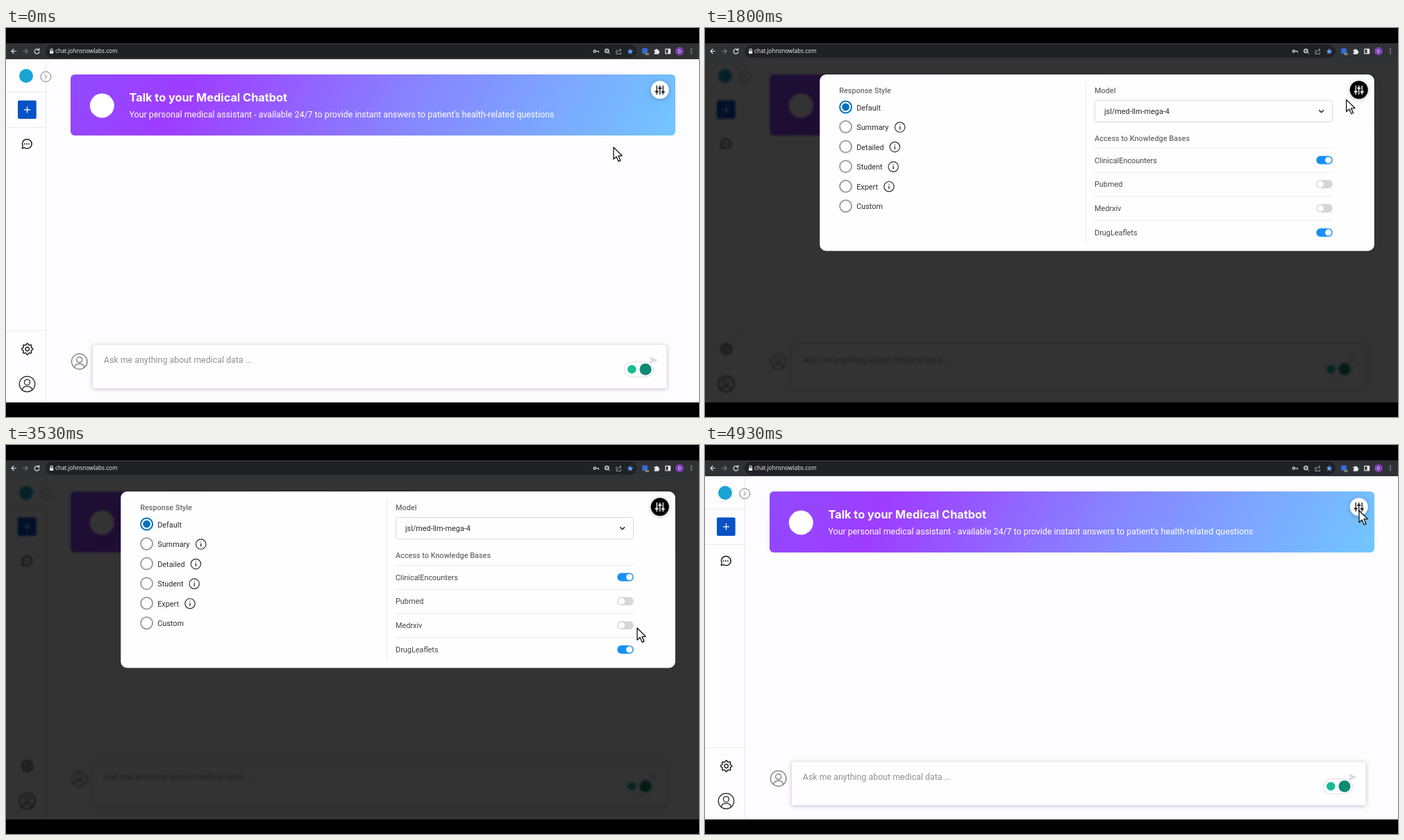
Animation, 998 px wide and 561 px high, one loop 4.99 s. Source, as an HTML page:

```html
<!DOCTYPE html>
<html lang="en">
<head>
<meta charset="utf-8">
<title>Medical Chatbot settings</title>
<style>
  html, body { margin: 0; width: 100%; height: 100%; overflow: hidden; background: #000; }
  svg { display: block; width: 998px; height: 561px; }
  text { font-family: Roboto, sans-serif; font-size: 10.87px; fill: #2b2b2d; }
  .line { fill: none; stroke-linecap: round; stroke-linejoin: round; }
  .rule { stroke: #ebe8ef; }
  .head { font-weight: 500; fill: #6c6c70; }
  .large { font-size: 12.42px; }
  .side { stroke: #1d1d1f; stroke-width: 1.4; }
  .bar { stroke: #dfe1e5; stroke-width: 1.2; }
  .box { filter: drop-shadow(0 1px 3px rgba(70, 35, 80, .3)); }
  .knob { filter: drop-shadow(0 1px 3px rgba(0, 0, 0, .25)); }
  .open #app { filter: blur(1.6px); }
  #shade, #panel { display: none; }
  .open #shade, .open #panel { display: inline; }
  #tune { fill: #fff; stroke: #111; }
  .open #tune { fill: #000; stroke: #fff; }
  #select { fill: #fefdff; stroke: #d9d8df; }
  #select.hover { stroke: #85858c; }
</style>
</head>
<body>
<svg id="stage" viewBox="0 0 998 561">
  <defs>
    <linearGradient id="banner" gradientUnits="userSpaceOnUse" x1="100" y1="20" x2="870" y2="405">
      <stop offset="0" stop-color="#8f4bff"/>
      <stop offset=".2" stop-color="#9e3dff"/>
      <stop offset=".55" stop-color="#8785ff"/>
      <stop offset="1" stop-color="#70ccff"/>
    </linearGradient>
    <clipPath id="page"><rect y="45" width="998" height="495"/></clipPath>
    <g id="user" class="line">
      <circle r="11.2"/>
      <circle cy="-2.6" r="4"/>
      <path d="M-7 8.2C-6 1.8 6 1.8 7 8.2"/>
    </g>
  </defs>

  <rect width="998" height="561"/>

  <!-- browser bar -->
  <rect y="22" width="998" height="23" fill="#303134"/>
  <rect x="57" y="24" width="851" height="19" rx="9.5" fill="#202124"/>
  <g class="line bar">
    <path d="M14.5 33.5H8M11 30.5l-3 3 3 3"/>
    <path d="M24.5 33.5H31M28 30.5l3 3-3 3" stroke="#77797d"/>
    <path d="M47 31.5a3.4 3.4 0 1 0 .8 2.8M47.8 29.6v2.4h-2.4"/>
    <path d="M64 33v-1.4a1.6 1.6 0 0 1 3.2 0V33"/>
    <circle cx="847.8" cy="33.5" r="1.6"/>
    <path d="M849.5 33.5h3.8v1.6"/>
    <circle cx="865.3" cy="33" r="2.7"/>
    <path d="M867.5 35.2l2 2M864.2 33h2.2" stroke-width="1"/>
    <path d="M880 32h-1v5.5h6.500v-2M881 35c.4-2.400 2-3.300 4.500-3.300M884 29.800l2 1.900-2 1.900" stroke="#9a9ca0" stroke-width="1"/>
    <rect x="949.8" y="30.3" width="6.8" height="6.600"/>
  </g>
  <rect x="63" y="33" width="5.200" height="4" rx=".6" fill="#dfe1e5"/>
  <text x="71" y="35.700" style="font:8.100px 'Noto Sans',sans-serif;fill:#e8eaed">chat.johnsnowlabs.com</text>
  <path d="M899 29.300l1.300 2.900 3.200.3-2.400 2.100.7 3.100-2.800-1.600-2.800 1.600.7-3.100-2.400-2.100 3.200-.3z" fill="#5b9bf8"/>
  <rect x="916" y="29.300" width="8" height="8" rx="1.500" fill="#2c6be0"/>
  <rect x="919.500" y="35" width="7" height="5" rx="1" fill="#3c4043"/>
  <text x="923" y="39.300" text-anchor="middle" style="font-size:5px;fill:#fff">9+</text>
  <path d="M933.500 31.500h2a1.300 1.300 0 0 1 2.600 0h2v2a1.300 1.300 0 0 1 0 2.600v1.600h-6.600v-2a1.200 1.200 0 0 0 0-2.400z" fill="#e8eaed"/>
  <rect x="953.400" y="30.300" width="3.400" height="6.600" fill="#e8eaed"/>
  <circle cx="970" cy="33.500" r="6" fill="#7b3fb0"/>
  <text x="970" y="35.900" text-anchor="middle" style="font-size:6.500px;fill:#fff">D</text>
  <path d="M987 30.500v.01M987 33.500v.01M987 36.500v.01" class="line" stroke="#e8eaed" stroke-width="1.600"/>

  <!-- page -->
  <g clip-path="url(#page)">
    <rect y="45" width="998" height="495" fill="#fdfcfe"/>
    <g id="app">
      <path class="rule" d="M57.500 45V540M0 92.500H57M0 143.500H57M0 436.500H57"/>
      <circle cx="29" cy="69" r="10" fill="#18a5d3"/>
      <circle cx="57.300" cy="70.200" r="7.300" fill="#fdfcfe" stroke="#77757a"/>
      <path class="line" d="M56.200 67.700l2.400 2.500-2.400 2.500" stroke="#66646a"/>
      <rect x="17" y="104.500" width="26.700" height="26.500" rx="2" fill="#0852c6"/>
      <path class="line" d="M26.300 117.800h8.400M30.500 113.600v8.400" stroke="#fff" stroke-width="1.200"/>
      <path class="line side" d="M23.200 173.600l1-3.400a6.900 6.600 0 1 1 2.500 2.500z"/>
      <path class="line side" d="M26.600 167.200v.01M29.700 167.200v.01M32.800 167.200v.01" style="stroke-width:2"/>
      <g id="gear" class="line side" transform="translate(30.700 463)"><circle r="2.700"/></g>
      <use href="#user" x="30.500" y="513.500" stroke="#29292b" stroke-width="1.300"/>

      <rect x="93" y="67" width="871" height="88" rx="6" fill="url(#banner)"/>
      <circle cx="138.300" cy="112" r="17.500" fill="#fff"/>
      <text x="177.500" y="105.500" style="font:700 16.300px Inter,sans-serif;fill:#fff">Talk to your Medical Chatbot</text>
      <text x="177.500" y="128.500" class="large" style="fill:#fff">Your personal medical assistant - available 24/7 to provide instant answers to patient's health-related questions</text>

      <use href="#user" x="105.700" y="481" stroke="#77706f" stroke-width="1.200"/>
      <rect class="box" x="125" y="457" width="826.500" height="62.500" rx="3" fill="#fefdff"/>
      <text x="140.800" y="483" class="large" style="fill:#929097">Ask me anything about medical data ...</text>
      <path d="M927 474l11.500 5-11.500 5 1.500-4.200 5-.8-5-.8z" fill="#d8d6dc"/>
      <rect x="890.500" y="481.500" width="42" height="21.500" rx="10.700" fill="#fff" stroke="#dedce2"/>
      <circle cx="901.300" cy="492.200" r="6.200" fill="#15bd93"/>
      <circle cx="921" cy="492.200" r="8.500" fill="#0d8b72"/>
    </g>
    <rect id="shade" y="45" width="998" height="495" fill="#000" fill-opacity=".8"/>
  </g>

  <!-- settings -->
  <g id="panel">
    <rect x="165.300" y="67" width="798.500" height="254.500" rx="9" fill="#fefdff"/>
    <path class="rule" d="M548.500 77V312M561 173.500H904M561 208.200H904M561 243H904M561 277.700H904"/>
    <text x="193.200" y="94.200" class="head">Response Style</text>
    <text x="561" y="94.200" class="head">Model</text>
    <text x="561" y="163" class="head">Access to Knowledge Bases</text>
    <rect id="select" x="561.500" y="104.500" width="342" height="31" rx="3"/>
    <text x="575" y="124.300">jsl/med-llm-mega-4</text>
    <path class="line" d="M884.700 118.700l3 3 3-3" stroke="#222" stroke-width="1.500"/>
    <g id="styles"></g>
    <g id="bases"></g>
  </g>

  <g id="tune" class="line">
    <circle class="knob" cx="941.700" cy="89.300" r="13" stroke="none"/>
    <path d="M937.200 83.500v12M941.700 83.500v12M946.200 83.500v12" stroke-width="1.300"/>
    <path d="M935.600 91.700h3.200M940.100 86.800h3.200M944.600 92.200h3.200" stroke-width="2"/>
  </g>

  <path id="cursor" d="M0 0V17.200L4 13.500 7.200 20.400 10 19.100 6.900 12.500 12.300 12.200Z" fill="#fff" stroke="#111" stroke-width="1.300" stroke-linejoin="round"/>
</svg>

<script>
const $ = id => document.getElementById(id);

// label, x of the info icon
const styles = [['Default'], ['Summary', 280.7], ['Detailed', 273.4], ['Student', 271.2], ['Expert', 265], ['Custom']];
const bases = [['ClinicalEncounters', true], ['Pubmed', false], ['Medrxiv', false], ['DrugLeaflets', true]];

const info = (x, y) => `<g class="line" stroke="#2f2f31" stroke-width="1.200">
  <circle cx="${x}" cy="${y}" r="7.200"/><path d="M${x} ${y - 0.6}v3.600M${x} ${y - 3.2}v.01" stroke-width="1.400"/></g>`;

$('styles').innerHTML = styles.map(([label, x], i) => {
  const y = 114 + i * 28.55;
  const color = i ? '#a09fa3' : '#0871bd';
  return `<circle cx="202.600" cy="${y}" r="8.500" fill="none" stroke="${color}" stroke-width="2"/>`
    + (i ? '' : `<circle cx="202.600" cy="${y}" r="5.400" fill="${color}"/>`)
    + `<text x="218.200" y="${y + 4.5}">${label}</text>` + (x ? info(x, y + 0.5) : '');
}).join('');

$('bases').innerHTML = bases.map(([label, on], i) => {
  const y = 190.5 + i * 34.8;
  return `<text x="561" y="${y + 4}" style="fill:#454549">${label}</text>
    <rect x="880.300" y="${y - 6}" width="23.500" height="12" rx="6" fill="${on ? '#1890f5' : '#d6d5d9'}"/>
    <circle cx="${on ? 897.7 : 886.4}" cy="${y}" r="4.600" fill="#fff"/>`;
}).join('');

let teeth = '';
for (let i = 0; i < 32; i++) {
  const a = (i - 0.5) * Math.PI / 16;
  const r = i % 4 < 2 ? 8 : 6.2;
  teeth += `${i ? 'L' : 'M'}${(r * Math.cos(a)).toFixed(2)} ${(r * Math.sin(a)).toFixed(2)}`;
}
$('gear').innerHTML += `<path d="${teeth}Z"/>`;

const LOOP = 4990, STEP = 200 / 3;
const OPEN = 13, CLOSE = 72;

// pointer path: step, x, y
const path = [
  [0, 875, 172], [8, 938, 106], [11, 938, 92], [25, 938, 92], [29, 902, 128],
  [33, 880, 198], [36, 880, 198], [37, 879.5, 197.5], [39, 880, 197], [46, 899, 309], [49, 899, 309],
  [53, 909, 264], [57, 938, 135], [60, 937, 117], [65, 940.5, 95], [66, 942, 94.5], [75, 942, 94.5]
];

// Slope at a point; flat next to a hold and at the ends.
function slope(i, axis) {
  const a = path[i - 1], p = path[i], b = path[i + 1];
  if (!a || !b) return 0;
  const before = p[axis] - a[axis], after = b[axis] - p[axis];
  return before * after <= 0 ? 0 : (before + after) / (b[0] - a[0]);
}

function along(n, axis) {
  const i = Math.max(0, path.findIndex(p => p[0] > n) - 1);
  const [p, q] = [path[i], path[i + 1]];
  const d = q[0] - p[0], u = (n - p[0]) / d, v = 1 - u;
  return v * v * (1 + 2 * u) * p[axis] + u * u * (3 - 2 * u) * q[axis]
    + d * u * v * (v * slope(i, axis) - u * slope(i + 1, axis));
}

function draw(t) {
  const n = Math.floor((t % LOOP + 3.4) / STEP);
  const x = along(n, 1), y = along(n, 2);
  $('stage').classList.toggle('open', n >= OPEN && n < CLOSE);
  $('select').classList.toggle('hover', x > 561 && x < 904 && y > 104 && y < 136);
  $('cursor').setAttribute('transform', `translate(${x.toFixed(2)} ${y.toFixed(2)})`);
}

const start = performance.now();
function tick() {
  draw(performance.now() - start);
  requestAnimationFrame(tick);
}
tick();
</script>
</body>
</html>
```
